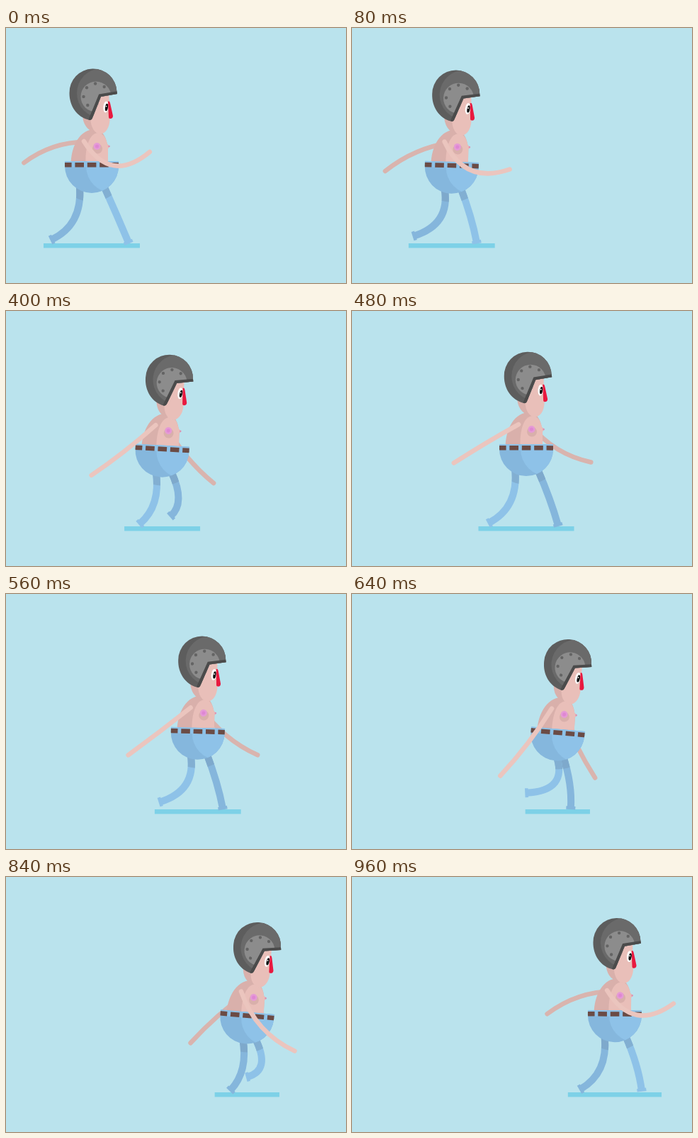
These frames come from a looping animation (480 px wide and 360 px high, 1000 ms). An HTML page with a canvas:

```html
<!DOCTYPE html>
<html lang="en">
<head>
<meta charset="utf-8">
<title>Walk cycle</title>
<style>
html, body { margin: 0; width: 100%; height: 100%; overflow: hidden; background: #bae3ed; }
canvas { display: block; }
</style>
</head>
<body>
<canvas id="stage" width="480" height="360"></canvas>
<script>
const ctx = document.getElementById('stage').getContext('2d');
const LOOP = 1000, TICK = 40;
const STRIDE = 520; // one step; a full cycle is two strides
const SKIN = '#e9bfb9', SKIN_DARK = '#d9b0ab', BLUE = '#8ec2e8', BLUE_DARK = '#85b7dd';

const path = d => new Path2D(d);
const HELMET = path('M34 1 L33.5 -2 A33.5 33.5 0 0 0 -33.5 0 C-33.5 18 -23 34 -5 38 Q-2 38 -1 35 L11 5 Z');
const RIM = path('M36 1 L11 5 L-3 39');
const TORSO = path('M-29 2 C-31 -22 -20 -50 2 -52 C14 -53 20 -42 22 -31 L25.5 -28 L23 -25 V2 Z');
const CHEST = path('M-8 2 C-10 -20 -6 -46 9 -47 C17 -46 20 -40 22 -31 L25.5 -28 L23 -25 V2 Z');
const PANTS = path('M-38 -7 H38 V0 A38 38 0 0 1 -38 0 Z');
const NOSE = path('M21 12 Q23 10 24 14 L28 32 Q28 36 24 36 Q22 36 22 34 Z');

const lerp = (a, b, t) => a + (b - a) * t;
const rad = deg => deg * Math.PI / 180;

function fill(shape, color) {
  ctx.fillStyle = color;
  ctx.fill(shape);
}

function ellipse(x, y, rx, ry, color, turn = 0) {
  ctx.beginPath();
  ctx.ellipse(x, y, rx, ry, turn, 0, Math.PI * 2);
  ctx.fillStyle = color;
  ctx.fill();
}

const disc = (x, y, r, color) => ellipse(x, y, r, r, color);

function group(x, y, turn, draw) {
  ctx.save();
  ctx.translate(x, y);
  ctx.rotate(turn);
  draw();
  ctx.restore();
}

function clipped(shape, draw) {
  ctx.save();
  ctx.clip(shape);
  draw();
  ctx.restore();
}

function limb(x, y, kx, ky, ex, ey, width, cap, color) {
  ctx.beginPath();
  ctx.moveTo(x, y);
  ctx.quadraticCurveTo(kx, ky, ex, ey);
  ctx.lineWidth = width;
  ctx.lineCap = cap;
  ctx.strokeStyle = color;
  ctx.stroke();
}

// A pendulum: angle from straight down, bulge sideways at the elbow.
function arm(x, y, angle, reach, bulge, color) {
  const dx = Math.sin(rad(angle)), dy = Math.cos(rad(angle));
  limb(x, y, x + dx * reach / 2 - dy * bulge * 2, y + dy * reach / 2 + dx * bulge * 2,
    x + dx * reach, y + dy * reach, 6.5, 'round', color);
}

// First half of the cycle swings the foot forward, the second keeps it planted.
function leg(u, hipX, hipY, bend, color, shade) {
  const phase = (u / STRIDE) % 2, swing = phase < 1;
  const s = phase % 1;
  const front = swing ? s : 1 - s;
  const lift = swing ? bend : 0;
  const x = hipX + lerp(-17, 18, front) + 6 * lift;
  const kx = hipX + lerp(-13, 36, front) + 20 * lift;
  const ky = lerp(278, 265, front) + 6 * lift;
  const fx = hipX + lerp(-57, 52, swing ? s * s * (1.3 - .3 * s) : front);
  const fy = 303 - 4 * (1 - front) ** 2 - 30 * lift;
  const draw = tint => limb(x, hipY + 30, kx, ky, fx, fy, 10, 'butt', tint);

  draw(color);
  group(fx, fy, Math.atan2(fy - ky, fx - kx), () => {
    ctx.fillStyle = color;
    ctx.fillRect(-3, -6.5, 4.5, 13);
  });
  const under = new Path2D();
  under.arc(hipX, hipY, 50, 0, Math.PI * 2);
  clipped(under, () => draw(shade));
}

function torso() {
  fill(TORSO, SKIN_DARK);
  fill(CHEST, SKIN);
  disc(8, -24.5, 7, SKIN_DARK);
  disc(7.5, -28, 5, '#e59ad6');
  disc(7.5, -28, 2.5, '#df86d4');
  disc(24.5, -28, 1.3, '#dc92b4');
}

function pants() {
  fill(PANTS, BLUE_DARK);
  clipped(PANTS, () => {
    disc(30, 0, 38, BLUE);
    ctx.fillStyle = BLUE;
    ctx.fillRect(-38, -7, 76, 8.5);
    ctx.fillStyle = '#6b4b45';
    for (let i = -2; i <= 2; i++) ctx.fillRect(i * 17.4 - 6.2, -5, 12.6, 6.5);
  });
}

function face() {
  ellipse(2, 30, 17, 24, SKIN_DARK);
  ellipse(10, 37, 13.5, 20.5, SKIN);
  ctx.fillStyle = SKIN;
  ctx.fillRect(8, 2, 14.5, 30);
  ellipse(18, 19.5, 3.7, 8, '#fff', .08);
  ellipse(19, 20, 2, 5.2, '#111', .15);
  disc(18.6, 18.6, .9, '#fff');
  fill(NOSE, '#e8193f');
}

function helmet() {
  fill(HELMET, '#5d5d5d');
  clipped(HELMET, () => {
    disc(12, 0, 35, '#6a6a6a');
    disc(4, 5, 21.5, '#8c8c8c');
    for (let i = 0; i < 5; i++) {
      const a = rad(-48 - 45 * i);
      disc(4 + 17.5 * Math.cos(a), 4 + 17.5 * Math.sin(a), 2.2, '#646464');
    }
    ctx.lineWidth = 8;
    ctx.lineCap = 'butt';
    ctx.strokeStyle = '#4b4b4b';
    ctx.stroke(RIM);
  });
}

function render(t) {
  // The stride skips ahead slightly in the middle of the loop.
  const u = t + 40 * Math.min(1, Math.max(0, (t - 400) / 160));
  const w = Math.PI * u / STRIDE;
  const bend = Math.sin(w) ** 2; // crouch, deepest when the legs pass
  const swing = Math.cos(w);
  const x = 121 + u / 4 - bend, y = 195 + 3.7 * bend;
  const shoulder = 160 + 2.5 * bend;
  const half = 68 - 33 * bend;

  ctx.fillStyle = '#bae3ed';
  ctx.fillRect(0, 0, 480, 360);
  ctx.fillStyle = '#7dd1e7';
  ctx.fillRect(x - half, 304, half * 2, 6.5);

  arm(x + 3 - 3 * swing, shoulder + 1, -7 - 66 * swing - 6 * bend, 100 + 12 * bend, 9 - 9 * bend, '#d9b4ae');
  leg(u, x, y, bend, '#85b6dc', '#7ea9cc');
  leg(u + STRIDE, x, y, bend, BLUE, '#82afd2');
  group(x, y, rad(5.5 * bend), torso);
  group(x + 2 + 18 * bend, 92 + 9.5 * bend, .15 * bend, () => {
    group(-2.5 * bend, -bend, 0, face);
    helmet();
  });
  group(x, y, rad(7.5 * bend), pants);
  arm(x - 11 + 4 * bend, shoulder, 11 + 70 * Math.cos(w + .06) - 18 * bend,
    100 - 6 * swing + 24 * bend, 14 + 13 * swing - 14 * bend, '#ebc5be');
}

const start = performance.now();
function tick() {
  const t = (performance.now() - start) % LOOP;
  render(Math.floor(t / TICK) * TICK);
  requestAnimationFrame(tick);
}
tick();
</script>
</body>
</html>
```
